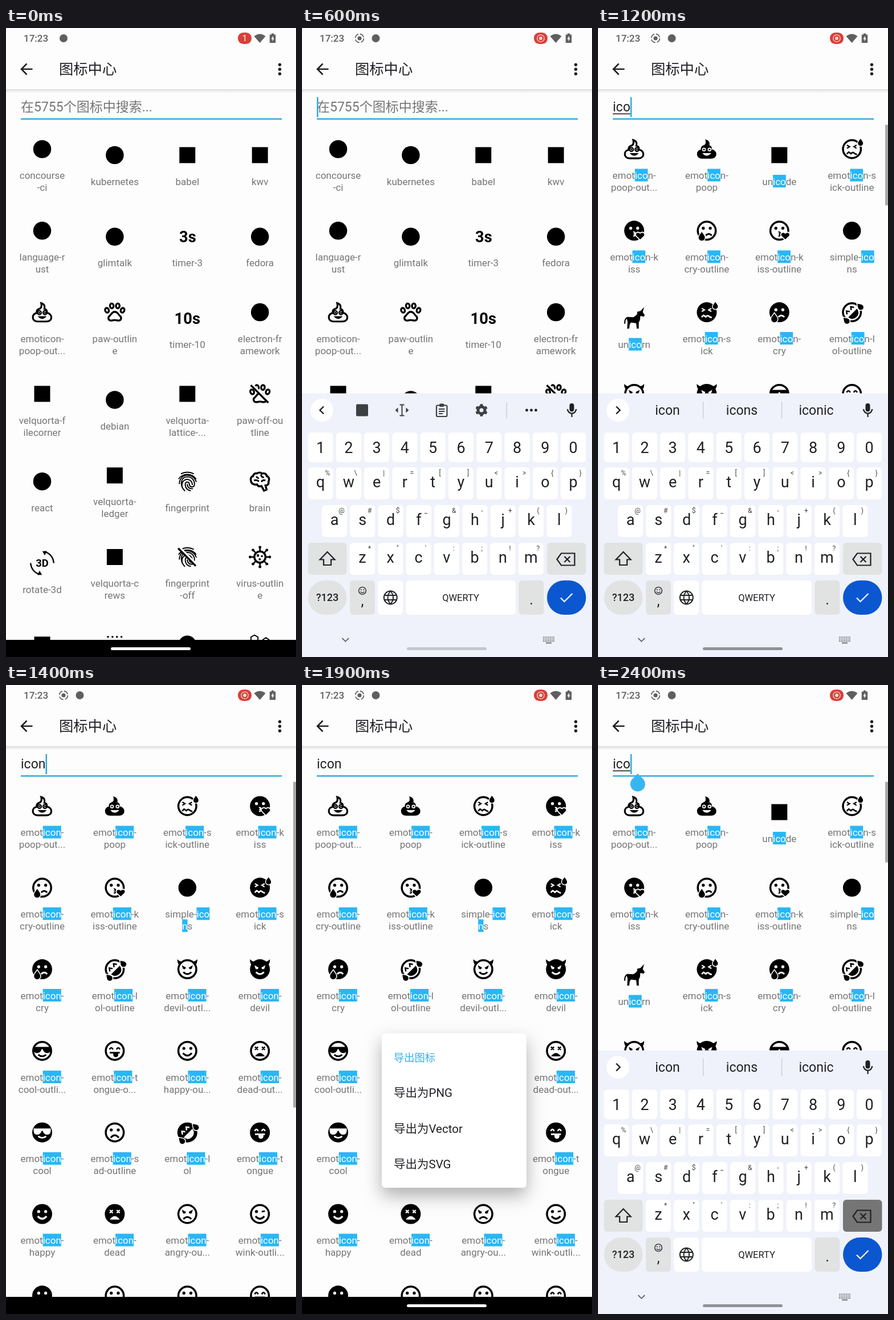
Animation, 509 px wide and 1101 px high, one loop 2500 ms. Source, as an HTML page with a canvas:

```html
<!DOCTYPE html>
<html lang="zh-CN">
<head>
<meta charset="utf-8">
<title>图标中心</title>
<style>
html, body { margin: 0; width: 100%; height: 100%; overflow: hidden; background: #fdfdfd; }
canvas { display: block; width: 509px; height: 1101px; }
</style>
</head>
<body>
<canvas id="stage"></canvas>
<script>
const W = 509, H = 1101, LOOP = 2500, STEP = 100;
const BG = '#fdfdfd', INK = '#000', BLUE = '#35aadc', HIT = '#29b6f6', GREY = '#757575', DARK = '#202124';
const FONT = 'Roboto, "Noto Sans CJK SC", "Noto Sans CJK", sans-serif';
const canvas = document.getElementById('stage');
const g = canvas.getContext('2d');
const dpr = window.devicePixelRatio || 1;
canvas.width = W * dpr;
canvas.height = H * dpr;

// Drawing helpers
function path(d, color = INK, lw = 0) {
  const p = typeof d === 'string' ? new Path2D(d) : d;
  if (lw) { g.strokeStyle = color; g.lineWidth = lw; g.stroke(p); }
  else { g.fillStyle = color; g.fill(p); }
}
function dot(x, y, r, color = INK, lw = 0) {
  const p = new Path2D();
  p.arc(x, y, r, 0, 7);
  path(p, color, lw);
}
function box(x, y, w, h, color, r = 0, lw = 0) {
  const p = new Path2D();
  p.roundRect(x, y, w, h, r);
  path(p, color, lw);
}
// y is the middle of the capitals
function text(s, x, y, size, color = DARK, align = 'left', weight = 400) {
  g.font = `${weight} ${size}px ${FONT}`;
  g.textAlign = align;
  g.fillStyle = color;
  g.fillText(s, x, y + size * 0.36);
}
function at(x, y, scale, draw, turn = 0) {
  g.save();
  g.translate(x, y);
  g.rotate(turn);
  g.scale(scale, scale);
  draw();
  g.restore();
}
function clipped(x, y, w, h, draw) {
  g.save();
  g.beginPath();
  g.rect(x, y, w, h);
  g.clip();
  draw();
  g.restore();
}
function shadowed(blur, dy, alpha, draw) {
  g.save();
  g.shadowColor = `rgba(0,0,0,${alpha})`;
  g.shadowBlur = blur * dpr;
  g.shadowOffsetY = dy * dpr;
  draw();
  g.restore();
}

// Icon parts on a 24 unit grid
const eyes = c => { dot(8.5, 9.5, 1.5, c); dot(15.5, 9.5, 1.5, c); };
const smile = c => path('M7.6 14.2Q12 19.2 16.4 14.2', c, 1.9);
const drop = (x, y, s, edge = 0) => at(x, y, s, () => {
  const d = 'M0-4C2-1.3 3 0 3 1.4a3 3 0 0 1-6 0C-3 0-2-1.3 0-4z';
  if (edge) path(d, BG, edge);
  path(d);
});
const faces = {
  happy(c) { eyes(c); smile(c); },
  sad(c) { eyes(c); path('M8 17.3Q12 12.3 16 17.3', c, 1.9); },
  wink(c) { dot(8.5, 9.5, 1.5, c); path('M13.8 9.7L17 9', c, 1.6); smile(c); },
  dead(c) {
    path('M7 8l3 3m0-3l-3 3M14 8l3 3m0-3l-3 3', c, 1.4);
    path('M7 17.5Q12 10.8 17 17.5z', c);
  },
  angry(c) {
    path('M6.5 7.6l4 2.2c-.2 2.4-3 2.4-3.3.2zM17.5 7.6l-4 2.2c.2 2.4 3 2.4 3.3.2z', c);
    path('M8 17Q12 13 16 17', c, 1.7);
  },
  devil(c) {
    path('M6.5 8l4 2.2c-.2 2.4-3 2.2-3.3.2zM17.5 8l-4 2.2c.2 2.4 3 2.2 3.3.2z', c);
    path('M8 14.8Q12 18.8 16 14.8', c, 1.7);
    path('M4 8C2.4 6.5 1.8 4.2 2 2c1.5 1.8 3.5 2.6 6 2.4zM20 8c1.6-1.5 2.2-3.8 2-6-1.5 1.8-3.5 2.6-6 2.4z');
  },
  cool(c) {
    path('M3.4 8h17.2v2c0 3-1.6 4.2-3.7 4.2s-3.8-1.6-4.2-3.8h-1.4c-.4 2.2-2.1 3.8-4.2 3.8S3.4 13 3.4 10z', c);
    path('M8 15.8Q12 19 16 15.8', c, 1.6);
  },
  tongue(c) {
    path('M6.8 10.6q1.7-3.4 3.4 0M13.8 10.6q1.7-3.4 3.4 0', c, 1.5);
    path('M7 13h10v1.6h-1.5v1.3a2.5 2.5 0 0 1-5 0v-1.3H7z', c);
  },
  kiss(c) {
    eyes(c);
    path('M11 13.2q3.2.5 1 2.1 2.2 1.6-1 2.1', c, 1.3);
    const heart = 'M18 20.7l-3.6-3.5c-1.7-2 1-4.6 3.6-2.1 2.6-2.5 5.3.1 3.6 2.1z';
    path(heart, BG, 2);
    path(heart);
  },
  cry(c) { eyes(c); path('M11 16.8Q14 13.6 17 16.8', c, 1.7); drop(7, 17.4, 1.05, 1.7); },
  sick(c) {
    path('M7 8l2.6 1.6L7 11.2M16.6 8L14 9.6l2.6 1.6', c, 1.3);
    path('M6.8 16.8l2-1.8 2.2 1.6q1.8-2.4 3.6-.2l2.4 1', c, 1.5);
    drop(20.6, 5, .85, 2);
  },
  lol(c) {
    g.translate(12, 12);
    g.rotate(-Math.PI / 4);
    g.translate(-12, -12);
    path('M7 10l2-2.7 2 2.7M13 10l2-2.7 2 2.7', c, 1.4);
    path('M5.8 13h12.4q-1 5.6-6.2 5.6T5.8 13z', c);
    drop(2.2, 13.5, .9, 2);
    drop(21.8, 13.5, .9, 2);
  }
};
function face(name, solid) {
  if (solid) dot(12, 12, 10); else dot(12, 12, 9, INK, 2);
  faces[name](solid ? BG : INK);
}
function poop(solid) {
  const d = 'M11 2.8c3 .8 4 3 3.2 5.8 1.8.2 3 1.8 2.4 4 2.5.2 4.6 2 4.6 4.4 0 2.6-2 4.2-5 4.2H7.4c-2.8 0-4.8-1.6-4.8-4.2 0-2.4 1.8-4 4-4.3C6 10.6 7.2 9 9 8.6c2.2-.5 2.8-3 2-5.8z';
  if (solid) path(d);
  path(d, INK, solid ? .8 : 1.8);
  for (const x of [9.2, 14.8]) {
    dot(x, 12.4, 1.9, solid ? BG : INK, solid ? 0 : 1.3);
    dot(x, 12.4, .9);
  }
  path('M7.5 16h9Q12 21.2 7.5 16z', solid ? BG : INK);
}
function paw() {
  for (const [x, y, turn] of [[4.2, 10, -.4], [9, 5.6, -.1], [15, 5.6, .1], [19.8, 10, .4]]) {
    const p = new Path2D();
    p.ellipse(x, y, 1.8, 2.4, turn, 0, 7);
    path(p, INK, 1.9);
  }
  path('M12 11.5c-3 0-3.4 2.8-5.3 4.2-2 1.6-1 4.6 1.5 4.6 1.5 0 2.4-.6 3.8-.6s2.3.6 3.8.6c2.5 0 3.5-3 1.5-4.6-1.9-1.4-2.3-4.2-5.3-4.2z', INK, 1.9);
}
function finger() {
  path('M5.5 4.4Q12 1 18.5 4.4M3.2 9.6C7.2 3.4 16.8 3.4 20.8 9.6M9.6 21.6C4 16 5 7.6 12 7.4c5 0 7.8 4.4 7 8.6-1 2.2-4.6 2-4.9-.8-.2-3.8-4.4-3.2-4.2.2.2 3.2 2.4 5.4 5.6 6M4 14.6C4 3.4 18 3 21 12.6M7 18.6C5 11 11 8.6 14.6 10.8c2 1.2 2.4 3 2.4 4.8M12 14.6c0 3.4 2 5 5.6 4.6', INK, 1.1);
}
function slash() {
  path('M4.5 2.6L21.5 19.6', BG, 2);
  path('M2.8 3.3L20.4 20.9', INK, 1.9);
}
const icons = {
  disc: () => dot(12, 12, 9),
  square: () => box(4, 4, 16, 16, INK),
  poop, paw, finger,
  pawOff() { paw(); slash(); },
  fingerOff() { finger(); slash(); },
  timer3: () => text('3s', 12.3, 12, 15.6, INK, 'center', 700),
  timer10: () => text('10s', 12, 12, 15.6, INK, 'center', 700),
  brain() {
    path('M9 4c2-1.4 4-1 5 .2 2-1 4.6.2 4.8 2.4 2.4.8 3 3.6 1.8 5.4.6 2.4-1 4-3 4l1 4.2-2.5 1-2.6-4.6c-2 .8-3.5 0-4.5-1.6-2.8.6-5.4-.6-6-3.2C2 9 3.6 7 5 6.8 5.4 4.6 7 3.6 9 4z', INK, 2);
    path('M8 7.5q2 0 2.4 2M6 11q3-1 5 1M13 5q.5 3 3 3M13.5 12.5q1-2.5 4-1.5', INK, 1.6);
  },
  virus() {
    dot(12, 12, 5.6, INK, 2);
    for (let i = 0; i < 8; i++) {
      const a = i * Math.PI / 4, x = Math.cos(a), y = Math.sin(a);
      path(`M${12 + 6 * x} ${12 + 6 * y}L${12 + 9.4 * x} ${12 + 9.4 * y}`, INK, 1.5);
      dot(12 + 9.8 * x, 12 + 9.8 * y, 1.4);
    }
    dot(10, 10.5, 1.3); dot(14, 11.2, 1); dot(11.8, 14.3, 1.1);
  },
  rotate() {
    text('3D', 12, 12, 10.5, INK, 'center', 700);
    path('M15 .8Q22.8 3.6 23.6 12M9 23.2Q1.2 20.4.4 12', INK, 1.4);
    path('M12.2.2l4.6-.2-2.2 4.4zM11.8 23.8l-4.6.2 2.2-4.4z');
  },
  unicorn: () => path('M15 5.5l3.4-.8L22 .8l-1.4 5L22.6 9l-1 1.4-3.4-.8-.4 4.2-1.2 2.4v6.2h-2l-.6-5.4-5-.8-1.4 1.6-.6 4.6H5l.4-7-.8-3-1.2 1.8-.4 3.6-1-.6q-.4-5 3-6.6l6 .4q3-1.4 4-3.3z'),
  dots() { for (let i = 0; i < 4; i++) dot(5.2 + 4.5 * i, 4.2, 1); },
  cubes() { path('M3 4.5l3.5-2 3.5 2v4H3zM15 7l3-2 3 2v4h-6z', INK, 1.1); }
};
function icon(name, x, y) {
  const [, base, outline] = name.match(/^(\w+)(-o)?$/);
  at(x, y, 1.75, () => {
    g.translate(-12, -12);
    if (faces[base]) face(base, !outline); else icons[base](!outline);
  });
}

// "icon label", where | breaks the label
const allItems = `disc concourse|-ci,disc kubernetes,square babel,square kwv
disc language-r|ust,disc glimtalk,timer3 timer-3,disc fedora
poop-o emoticon-|poop-out...,paw paw-outlin|e,timer10 timer-10,disc electron-fr|amework
square velquorta-f|ilecorner,disc debian,square velquorta-|lattice-...,pawOff paw-off-ou|tline
disc react,square velquorta-|ledger,finger fingerprint,brain brain
rotate rotate-3d,square velquorta-c|rews,fingerOff fingerprint|-off,virus virus-outlin|e
square x,dots x,disc x,cubes x`;
const iconItems = `poop-o emoticon-|poop-out...,poop emoticon-|poop,sick-o emoticon-s|ick-outline,kiss emoticon-k|iss
cry-o emoticon-|cry-outline,kiss-o emoticon-k|iss-outline,disc simple-ico|ns,sick emoticon-s|ick
cry emoticon-|cry,lol-o emoticon-l|ol-outline,devil-o emoticon-|devil-outl...,devil emoticon-|devil
cool-o emoticon-|cool-outli...,tongue-o emoticon-t|ongue-o...,happy-o emoticon-|happy-ou...,dead-o emoticon-|dead-out...
cool emoticon-|cool,sad-o emoticon-s|ad-outline,lol emoticon-l|ol,tongue emoticon-t|ongue
happy emoticon-|happy,dead emoticon-|dead,angry-o emoticon-|angry-ou...,wink-o emoticon-|wink-outli...
happy x|x,happy-o x|x,happy-o x|x,tongue-o x|x`;
const icoItems = `poop-o emoticon-|poop-out...,poop emoticon-|poop,square unicode,sick-o emoticon-s|ick-outline
kiss emoticon-k|iss,cry-o emoticon-|cry-outline,kiss-o emoticon-k|iss-outline,disc simple-ico|ns
unicorn unicorn,sick emoticon-s|ick,cry emoticon-|cry,lol-o emoticon-l|ol-outline
devil-o x|x,devil x|x,cool-o x|x,tongue-o x|x`;

function label(s, x, y, query) {
  const lines = s.split('|');
  const from = query ? lines.join('').indexOf(query) : -1;
  const to = from < 0 ? -1 : from + query.length;
  let pos = 0;
  lines.forEach((line, i) => {
    const cy = y + 21 * i, size = 17;
    g.font = `400 ${size}px ${FONT}`;
    const left = x - g.measureText(line).width / 2;
    const a = Math.min(Math.max(from - pos, 0), line.length);
    const b = Math.min(Math.max(to - pos, 0), line.length);
    const xa = left + g.measureText(line.slice(0, a)).width;
    const xb = left + g.measureText(line.slice(0, b)).width;
    text(line.slice(0, a), left, cy, size, GREY);
    if (b > a) {
      box(xa, cy - 11.5, xb - xa, 22, HIT);
      text(line.slice(a, b), xa, cy, size, '#fff');
    }
    text(line.slice(b), xb, cy, size, GREY);
    pos += line.length;
  });
}
function grid(items, query) {
  clipped(0, 165, W, 906, () => items.split('\n').forEach((row, r) =>
    row.split(',').forEach((item, c) => {
      const [name, caption] = item.split(' ');
      const x = 63.5 + 127.4 * c, shift = caption.includes('|') ? 0 : 10.5;
      const y = 212 + 142.8 * r + shift;
      icon(name, x, y);
      label(caption, x, y + 46, query);
    })));
}

function recordGlyph(x, y, color) {
  dot(x, y, 3.6, color);
  g.setLineDash([9, 2.8]);
  dot(x, y, 7.4, color, 1.6);
  g.setLineDash([]);
}
function statusBar(recording, color, hole) {
  text('17:23', 31, 18, 17, color, 'left', 500);
  if (recording) recordGlyph(101, 18, color);
  dot(recording ? 129.5 : 101, 18, 7, color);
  box(407, 8, 24, 20, '#da3f38', 9.5);
  if (recording) { dot(419, 18, 6.2, '#f6d5d3', 1.3); dot(419, 18, 3, '#f6d5d3'); }
  else text('1', 419, 18, 15, '#fff', 'center');
  path('M435.5 14.5Q445.5 6.5 455.5 14.5L445.5 26z', color);
  path('M466 9.5h4v2h3.2v14.5h-10.4V11.5H466z', color);
  path('M468.8 13.5l-3.4 6h2.2v4l3.2-5.8h-2z', hole);
}
function header() {
  const fade = g.createLinearGradient(0, 107, 0, 114);
  fade.addColorStop(0, '#dedede');
  fade.addColorStop(1, BG);
  g.fillStyle = fade;
  g.fillRect(0, 107, W, 7);
  path('M46.5 72H28M36.5 62.5L27 72l9.5 9.5', DARK, 2.6);
  text('图标中心', 93, 72, 25.3);
  for (const y of [64.2, 72.2, 80.2]) dot(480.5, y, 2.7, DARK);
}
function search(s) {
  if (s.query) text(s.query, 26, 138, 23);
  else text('在5755个图标中搜索...', 26, 138, 23, GREY);
  box(26, 158, 458, 2.4, BLUE);
  const end = 26 + (s.query ? g.measureText(s.query).width : 0);
  if (s.compose) box(26, 149.5, end - 26, 1.6, DARK);
  if (s.caret) box(end, 121, 2.6, 35, BLUE);
  if (s.handle) path(`M${end + 13} 155l9.2 9.2a13 13 0 1 1-18.4 0z`, '#38b6f4');
}

// Keyboard
function key(x, y, w, h, color = '#fff', r = 6) { box(x, y, w, h, color, r); }
function keyRow(chars, hints, x0, y, h) {
  [...chars].forEach((ch, i) => {
    const x = x0 + 49.3 * i;
    key(x, y, 44, h);
    text(ch, x + 22, y + h / 2 - (hints ? 2.5 : 0), 27, DARK, 'center');
    if (hints) text(hints[i], x + 34.5, y + 10, 12, '#444', 'center');
  });
}
function mic() {
  box(469.5, 657, 8, 14.5, DARK, 4);
  path('M466 667a7.6 7.6 0 0 0 15.2 0M473.6 675v6', DARK, 2.2);
}
function tools() {
  path('M38 662.5l-6.5 6.5 6.5 6.5', DARK, 2.4);
  box(95, 658.5, 21, 21, '#3c4043', 2);
  path('M171.5 659.5h8M171.5 678.5h8M175.5 659.5v19', '#3c4043', 2);
  path('M168.5 664.5v9l-5-4.5zM182.5 664.5v9l5-4.5z', '#3c4043');
  box(236, 660.5, 18.5, 19.5, '#3c4043', 2, 2.2);
  box(241, 657.5, 8.5, 5.5, '#3c4043', 2);
  path('M240 667h10.5M240 671h10.5M240 675h7', '#3c4043', 1.8);
  dot(315, 669, 6, '#3c4043', 5);
  for (let i = 0; i < 6; i++) at(315, 669, 1, () => box(-2.5, -10.8, 5, 4, '#3c4043', 1), i * Math.PI / 3);
  box(358.5, 655, 1.2, 28, '#c4c7cf');
  for (const x of [394.5, 402.5, 410.5]) dot(x, 669, 2.4, DARK);
}
function suggestions() {
  path('M32 662.5l6.5 6.5-6.5 6.5', DARK, 2.4);
  ['icon', 'icons', 'iconic'].forEach((s, i) => text(s, 122 + 130.5 * i, 669, 23, DARK, 'center'));
  for (const x of [184, 322]) box(x, 654, 1.2, 30, '#c4c7cf');
}
function keyboard(s) {
  const soft = '#e1e3e3';
  box(0, 639.5, W, 470, '#eff2fb');
  dot(35, 669, 20, '#fff');
  if (s.query) suggestions(); else tools();
  mic();
  keyRow('1234567890', '', 10.5, 708, 52);
  keyRow('qwertyuiop', '%\\|=[]<>{}', 10.5, 769, 56);
  keyRow('asdfghjkl', '@#$_&-+()', 35, 835, 56);
  keyRow('zxcvbnm', '*"\':;!?', 84, 901, 56);
  key(10.5, 901, 68, 56, soft);
  path('M44.5 917l-13 13.5h6.5v9.5h13v-9.5h6.5z', DARK, 2.2);
  key(430, 901, 68.5, 56, s.erase ? '#757575' : soft);
  path('M447.5 930l7.5-10.5h23.5v21H455zM460.5 925l10 10m0-10l-10 10', DARK, 2.2);
  key(10.5, 967, 68, 60, soft, 30);
  text('?123', 44.5, 997, 18, DARK, 'center', 500);
  key(84, 967, 44, 60, soft);
  dot(106, 985, 6.4, DARK, 1.4);
  dot(103.7, 983.3, 1, DARK);
  dot(108.3, 983.3, 1, DARK);
  path('M102.7 986.6q3.3 4 6.6 0', DARK, 1.3);
  text(',', 106, 1002, 25, DARK, 'center');
  key(133.3, 967, 44, 60);
  dot(155.3, 997, 11.5, DARK, 2);
  path('M144.5 993h21.6M144.5 1001h21.6M155.3 985.5q-9.5 11.5 0 23M155.3 985.5q9.5 11.5 0 23', DARK, 1.9);
  key(182.5, 967, 192.5, 60);
  text('QWERTY', 278.5, 997, 16.5, DARK, 'center');
  key(380.5, 967, 44, 60, soft);
  text('.', 402.5, 1000, 25, DARK, 'center');
  key(430, 967, 68.5, 60, '#0b57d0', 30);
  path('M454 997.5l6.5 6.5 14-14', '#fff', 2.2);
  path('M70.5 1068l5.8 5.8 5.8-5.8', '#5f6368', 1.8);
  for (let r = 0; r < 3; r++) for (let i = 0; i < 7; i++) box(423 + 3 * i, 1065.5 + 3.3 * r, 1.8, 1.8, '#5f6368');
  box(428, 1075.5, 10, 1.8, '#5f6368');
}

function menu(alpha, pressed) {
  g.save();
  g.globalAlpha = alpha;
  shadowed(30, 14, .3, () => box(140, 609.5, 254, 270.5, '#fff', 6));
  if (pressed) box(140, 683, 254, 62, '#ececec');
  text('导出图标', 161, 652, 18.3, '#3bb0e2');
  ['PNG', 'Vector', 'SVG'].forEach((s, i) => text('导出为' + s, 161, 714 + 62.2 * i, 20.5));
  g.restore();
}
function dialog(alpha) {
  g.save();
  g.globalAlpha = alpha;
  shadowed(34, 14, .4, () => box(44, 313, 421, 481, BG, 7));
  text('导出PNG', 76, 355, 25.3, DARK, 'left', 500);
  text('图标名', 76, 408, 18, GREY);
  text('ic_emoticon_lol_outline.png', 81, 452, 23.2);
  box(81, 471, 348, 2.6, '#2eaee5');
  text('图标颜色', 76, 496, 18, GREY);
  clipped(75, 516.5, 359, 39, () => {
    for (let r = 0; r < 7; r++) for (let c = r % 2; c < 62; c += 2)
      box(75 + 6 * c, 516.5 + 6 * r, 6, 6, '#d0d0d0');
  });
  box(81.5, 523, 346, 27.5, '#707070');
  text('#FF757575', 89, 537, 18, '#fff');
  text('图标尺寸', 76, 583, 18, GREY);
  text('96', 96, 628, 20.5);
  path('M396 625h13.5l-6.7 6.7z', '#5c5c5c');
  box(85.5, 682, 21, 21, '#5f5f5f', 2, 2.4);
  text('自适应图标', 118, 692.5, 18);
  text('取消', 325, 754, 18, '#2eaee5', 'center');
  text('导出', 408, 754, 18, '#2eaee5', 'center');
  g.restore();
}

// State of the screen at a 100 ms step
function stateAt(n) {
  const s = {
    recording: n > 0, query: '', caret: n >= 4 && n < 9 || n === 11,
    kb: null, bar: 0, barH: 570, menu: 0, dialog: 0, dim: 0, pill: 1
  };
  if (n >= 3 && n < 14) {
    s.kb = [300, 90][n - 3] || 0;
    s.pill = Math.min(Math.max((n - 4) * .23, 0), 1);
  }
  if (n === 12) Object.assign(s, { query: 'ico', compose: true, caret: true, bar: 1, barH: 141 });
  if (n >= 13) Object.assign(s, { query: 'icon', caret: n < 18 });
  if (n === 13) Object.assign(s, { compose: true, bar: 1, barH: 155 });
  if (n >= 14 && n < 18) { s.bar = [1, 1, .5, 0][n - 14]; s.pill = [0, .5, 1, 1][n - 14]; }
  if (n >= 18 && n < 21) s.menu = n === 18 ? .55 : 1;
  s.pressed = n === 20;
  if (n === 21 || n === 22) { s.dialog = n === 21 ? .7 : 1; s.dim = n === 21 ? .2 : .3; }
  if (n >= 23) Object.assign(s, { kb: 0, caret: true, handle: true, compose: true });
  if (n === 24) Object.assign(s, { query: 'ico', erase: true, bar: 1, barH: 141 });
  return s;
}
function draw(s) {
  g.setTransform(dpr, 0, 0, dpr, 0, 0);
  box(0, 0, W, H, BG);
  grid({ '': allItems, ico: icoItems, icon: iconItems }[s.query], s.query);
  header();
  if (s.bar) box(504, 169.5, 5, s.barH, `rgba(0,0,0,${.33 * s.bar})`);
  search(s);
  if (s.dim) box(0, 0, W, H, `rgba(0,0,0,${s.dim})`);
  statusBar(s.recording, s.dim ? '#fff' : '#5f5f5f', s.dim ? '#b1b1b1' : BG);
  if (s.menu) menu(s.menu, s.pressed);
  if (s.dialog) dialog(s.dialog);
  box(0, 1071, W, 30, '#000');
  if (s.kb !== null) at(0, s.kb, 1, () => keyboard(s));
  g.globalAlpha = s.pill;
  box(184, 1084, 140, 5, s.kb === null ? '#fff' : '#909298', 2.5);
  g.globalAlpha = 1;
}

const start = performance.now();
let shown = -1;
function tick() {
  const n = Math.floor((performance.now() - start) % LOOP / STEP);
  if (n !== shown) draw(stateAt(shown = n));
  requestAnimationFrame(tick);
}
tick();
</script>
</body>
</html>
```
